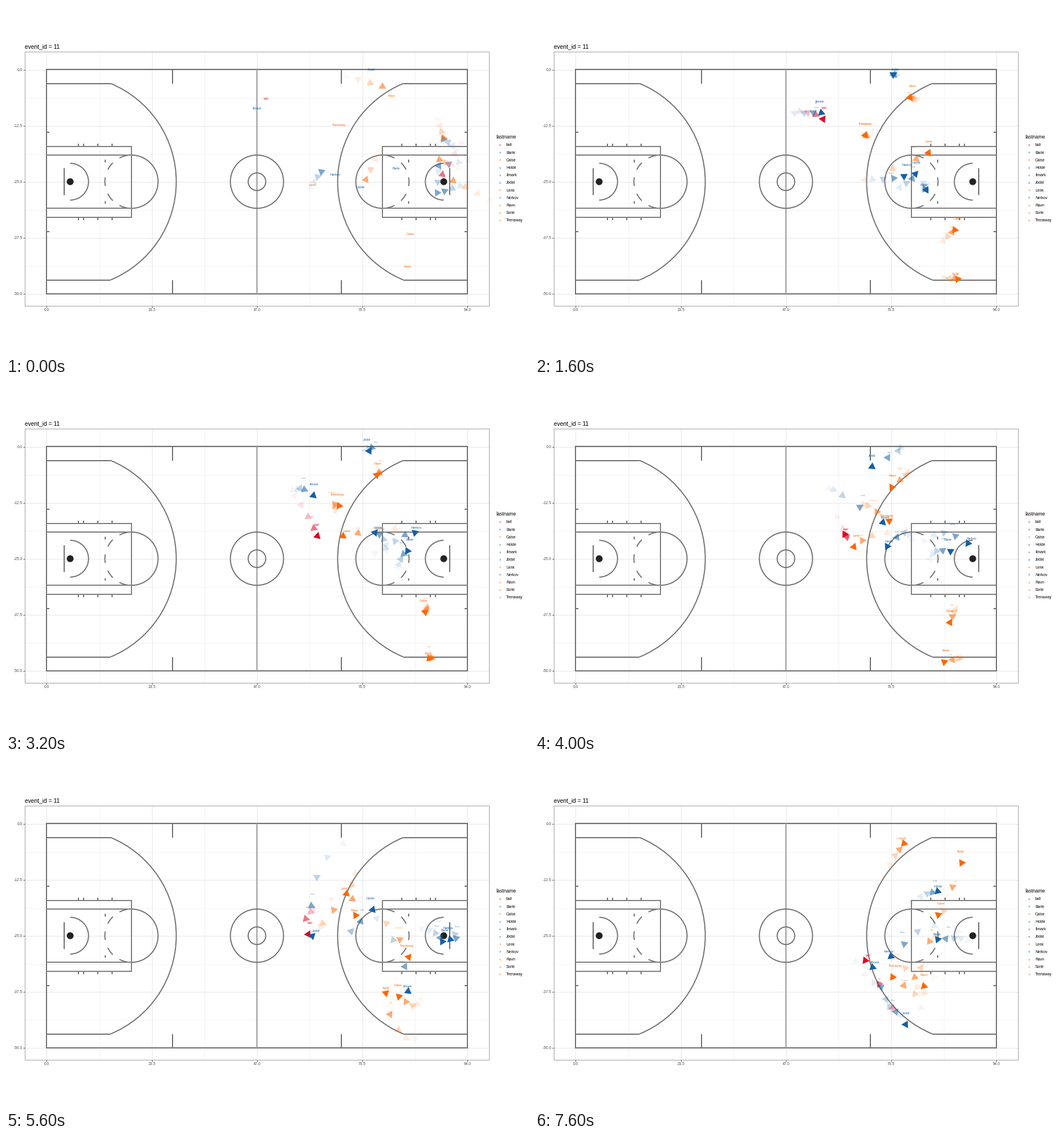
Write a matplotlib script that moves like this. It is 917x611 px and loops after 8000 ms.

```python
import math
import random

import matplotlib.pyplot as plt
import numpy as np
from matplotlib.animation import FuncAnimation
from matplotlib.collections import PolyCollection
from matplotlib.colors import to_rgba
from matplotlib.patches import Arc, Circle, Rectangle

W, H, DPI = 917, 611, 100
STEPS, INTERVAL = 20, 400
RED, BLUE, ORANGE = "#dc0524", "#145fa5", "#ff6600"
LINE, SOFT = "#707070", "#808080"
WAKE = 4
KEYS = np.array([0, 4, 8, 12, 14, 16, 19])
MID_X, MID_Y = 440, 307.6

plt.rcParams["font.family"] = "Liberation Sans"
fig = plt.figure(figsize=(W / DPI, H / DPI), dpi=DPI, facecolor="white")
ax = fig.add_axes([0, 0, 1, 1])
ax.set(xlim=(0, W), ylim=(H, 0))
ax.axis("off")


def points(px):
    return px * 72 / DPI


def write(x, y, text, px, color="black", **style):
    """Text centred vertically on y."""
    return ax.text(x, y + 0.36 * px, text, fontsize=points(px), color=color,
                   va="baseline", **style)


def line(x0, y0, x1, y1, color=LINE, width=2, z=2):
    ax.plot([x0, x1], [y0, y1], color=color, lw=points(width), zorder=z,
            solid_capstyle="butt")


def arc(x, r, start=0, end=360, style="-"):
    ax.add_patch(Arc((x, MID_Y), 2 * r, 2 * r, theta1=start, theta2=end,
                     color=LINE, lw=points(1.9), ls=style, zorder=2))


def draw_panel():
    xs = np.linspace(71.3, 808.9, 5)
    ys = np.linspace(111.8, 503.6, 5)
    for ticks, vertical in ((xs, True), (ys, False)):
        middles = (ticks[:-1] + ticks[1:]) / 2
        for values, width in ((middles, 0.5), (ticks, 1)):
            for v in values:
                ends = (v, 80, v, 525) if vertical else (33, v, 847, v)
                line(*ends, "#e6e6e6", width, 1)
    ax.add_patch(Rectangle((33.3, 80), 813.4, 445, fill=False, ec="#a6a6a6",
                           lw=points(1.1), zorder=1.5))
    for i, (x, y) in enumerate(zip(xs, ys)):
        line(x, 525, x, 528, "#444444", 0.9)
        line(30, y, 33, y, "#444444", 0.9)
        write(x, 531.7, f"{23.5 * i:.1f}", 6.7, "#4d4d4d", ha="center")
        write(29, y, f"{-12.5 * i if i else 0:.1f}", 6.7, "#4d4d4d", ha="right")
    write(33, 70, "event_id = 11", 10.2)


def draw_half(mirror):
    """One end of the court, described for the left side."""
    def mx(x):
        return 2 * MID_X - x if mirror else x

    def half_line(x0, y0, x1, y1, *style):
        line(mx(x0), y0, mx(x1), y1, *style)

    def half_arc(x, r, start, end, style="-"):
        if mirror:
            start, end = 180 - end, 180 - start
        arc(mx(x), r, start, end, style)

    bend = math.degrees(math.asin(172 / 186))
    half_arc(112.5, 186, -bend, bend)
    half_arc(112.5, 32.2, -90, 90)
    half_arc(220, 46.6, -90, 90)
    half_arc(220, 46.6, 90, 270, (11.9, (7.9, 7.6)))
    half_line(220, 245, 220, 370.5, SOFT)
    half_line(102, 284, 102, 331)
    for side in (-1, 1):
        def at(distance):
            return MID_Y + side * distance
        half_line(71, at(172), 183, at(172))
        half_line(71, at(87), 76, at(87))
        half_line(174, at(34), 174, at(38.5))
        half_line(291.7, at(172), 291.7, at(196))
        for distance in (46.3, 62.1):
            half_line(71, at(distance), 220, at(distance), SOFT)
        for x in (127, 136, 161, 186):
            half_line(x, at(63), x, at(67))
    ax.add_patch(Circle((mx(112.5), MID_Y), 6, color="#222222", lw=0, zorder=3))


def draw_court():
    ax.add_patch(Rectangle((71, 111), 738, 393, fill=False, ec=LINE,
                           lw=points(2), zorder=2))
    line(MID_X, 111, MID_X, 504, "#a0a0a0", 2.2)
    for r in (46.6, 15.4):
        arc(MID_X, r)
    draw_half(False)
    draw_half(True)


class Mover:
    """A named marker gliding through a few key spots.

    `before` is where it stood as the previous play ended.
    """

    def __init__(self, name, color, before, *spots):
        self.name, self.color = name, color
        self.before = np.array(before, float)
        self.spots = np.array(spots, float)
        self.slopes = np.gradient(self.spots, KEYS, axis=0)

    def rng(self, k):
        return random.Random(f"{self.name}{k}")

    def position(self, k):
        if k < 0:
            rng = self.rng("drift")
            drift = rng.uniform(-28, 22), rng.uniform(-25, 15)
            return self.before + np.array(drift) * (-1 - k)
        i = min(np.searchsorted(KEYS, k, "right") - 1, len(KEYS) - 2)
        span = KEYS[i + 1] - KEYS[i]
        u = (k - KEYS[i]) / span
        p, q = self.spots[i:i + 2]
        m, n = self.slopes[i:i + 2] * span
        return (p * (1 + 2 * u) * (1 - u) ** 2 + m * u * (1 - u) ** 2
                + q * u * u * (3 - 2 * u) - n * u * u * (1 - u))

    def triangle(self, k, radius=7.6):
        turns = np.radians(self.rng(k).uniform(0, 120) + np.array([0, 120, 240]))
        offsets = np.column_stack([np.sin(turns), -np.cos(turns)])
        return self.position(k) + radius * offsets

    def label_spot(self, k):
        rng = self.rng(f"label{k}")
        return self.position(k) + (rng.uniform(-6, 7), rng.choice((-9, -20)))


movers = [
    Mover("ball", RED, (765, 295), (450, 182), (505, 198), (546, 268),
          (534, 266), (530, 305), (626, 437), (579, 351)),
    Mover("Barle", BLUE, (756, 327), (680, 304), (686, 322), (704, 294),
          (753, 303), (765, 318), (747, 312), (706, 314)),
    Mover("Calse", ORANGE, (760, 269), (707, 419), (736, 392), (735, 401),
          (713, 430), (689, 414), (670, 397), (707, 271)),
    Mover("Holde", BLUE, (759, 280), (628, 326), (667, 294), (647, 262),
          (605, 300), (643, 262), (676, 239), (706, 230)),
    Mover("Ilmark", BLUE, (767, 233), (438, 188), (502, 187), (539, 197),
          (679, 315), (705, 405), (642, 447), (592, 363)),
    Mover("Jodal", BLUE, (769, 324), (637, 120), (628, 120), (637, 119),
          (545, 205), (537, 308), (594, 390), (650, 463)),
    Mover("Lenk", ORANGE, (631, 304), (532, 322), (690, 257), (591, 268),
          (555, 286), (597, 234), (622, 183), (647, 146)),
    Mover("Nerkov", BLUE, (553, 290), (573, 304), (647, 298), (717, 262),
          (787, 305), (779, 314), (700, 290), (624, 344)),
    Mover("Ravn", ORANGE, (784, 306), (674, 166), (657, 160), (650, 161),
          (606, 219), (613, 272), (635, 342), (682, 396)),
    Mover("Sorle", ORANGE, (767, 231), (708, 476), (741, 478), (742, 482),
          (688, 473), (666, 408), (700, 309), (748, 180)),
    Mover("Trenaway", ORANGE, (660, 141), (587, 228), (579, 226), (584, 215),
          (667, 286), (706, 345), (683, 408), (627, 380)),
]


def fade(age):
    """Strength of a marker left behind `age` steps ago."""
    return 0.95 ** (age * age) * 0.58 ** age


draw_panel()
draw_court()
write(859, 228.7, "lastname", 8.7)
for row, mover in enumerate(movers):
    y = 243 + 13.2 * row
    write(866, y, "a", 5.5, mover.color, alpha=0.65, ha="center", weight="bold")
    write(877, y, mover.name, 6.8)

markers = PolyCollection([], linewidths=0, zorder=4)
ax.add_collection(markers)
labels = {(mover, age): write(0, 0, mover.name, 5.6 * fade(age), mover.color,
                              ha="center", alpha=fade(age), zorder=5)
          for mover in movers for age in range(3)}


def update(step):
    # The opening step has labels but no markers of its own.
    shown = [(mover, age) for age in range(WAKE, -1, -1) for mover in movers
             if age != step]
    markers.set_verts([mover.triangle(step - age) for mover, age in shown])
    markers.set_facecolor([to_rgba(mover.color, fade(age)) for mover, age in shown])
    for (mover, age), label in labels.items():
        label.set_visible(step >= age)
        if step >= age:
            x, y = mover.label_spot(step - age)
            label.set_position((x, y + 2 * fade(age)))
    return [markers, *labels.values()]


animation = FuncAnimation(fig, update, frames=STEPS, interval=INTERVAL,
                          repeat=True, repeat_delay=0, blit=False)
plt.show()
```
